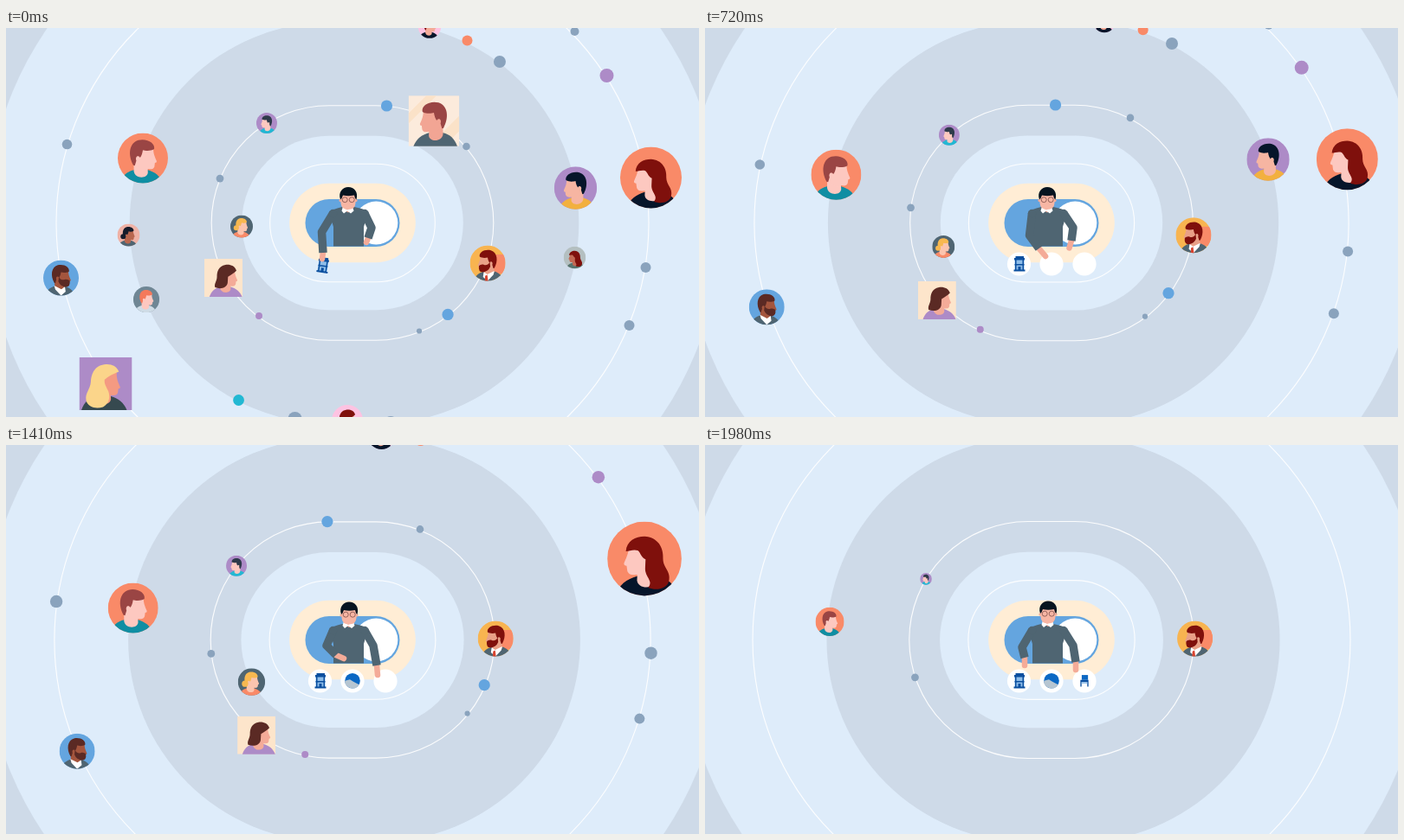
Write an HTML page with a canvas that moves like this. It is 800 by 450 pixels and loops after 2.01 s.

```html
<!DOCTYPE html>
<html lang="en">
<head>
<meta charset="utf-8">
<title>Orbit</title>
<style>
html, body { margin: 0; width: 100%; height: 100%; overflow: hidden; background: #deecfa; }
canvas { display: block; width: 800px; height: 450px; }
</style>
</head>
<body>
<canvas id="stage" width="800" height="450"></canvas>
<script>
const ctx = document.getElementById('stage').getContext('2d');
const LOOP = 2010, TAU = Math.PI * 2;
const LEFT = 373, RIGHT = 427, MID = 225.5, RUN = RIGHT - LEFT;

const light = '#deecfa', dark = '#cedae8', slate = '#4f6572', navy = '#06152a';
const orange = '#f98a68', purple = '#ad8bc7', blue = '#64a5df', steel = '#8aa3bd';
const maroon = '#7f100c', rust = '#9a4544', brown = '#5b2a24', cyan = '#22b8d3';
const pale = '#fdc8c0', peach = '#f4ab98', pink = '#fdc3e2', yellow = '#f8b850';

const clamp = (v, a, b) => Math.min(b, Math.max(a, v));
const mix = (a, b, k) => a + (b - a) * k;

// 0 to 1 with a swell of a quarter halfway
function pop(p) {
  const q = 1 - clamp(p, 0, 1);
  return 1 + 3 * q * q - 4 * q * q * q;
}

function disc(x, y, r, color) {
  if (r <= 0) return;
  ctx.fillStyle = color;
  ctx.beginPath();
  ctx.arc(x, y, r, 0, TAU);
  ctx.fill();
}

function pill(r, fill, line, dx = 0) {
  ctx.beginPath();
  ctx.arc(LEFT + dx, MID, r, Math.PI / 2, Math.PI * 1.5);
  ctx.arc(RIGHT + dx, MID, r, -Math.PI / 2, Math.PI / 2);
  ctx.closePath();
  if (fill) { ctx.fillStyle = fill; ctx.fill(); }
  if (line) { ctx.strokeStyle = line; ctx.lineWidth = 1.1; ctx.stroke(); }
}

function shape(color, d) {
  ctx.fillStyle = color;
  ctx.fill(new Path2D(d));
}

// Distance along a pill, counter-clockwise from its leftmost point
function toTrack(x, y) {
  const cx = clamp(x, LEFT, RIGHT), r = Math.hypot(x - cx, y - MID);
  let d;
  if (x < LEFT) d = Math.atan2(y - MID, LEFT - x) * r;
  else if (x > RIGHT) d = Math.PI * r + RUN + Math.atan2(MID - y, x - RIGHT) * r;
  else if (y > MID) d = Math.PI / 2 * r + x - LEFT;
  else d = Math.PI * 1.5 * r + RUN + RIGHT - x;
  return { r, d };
}

function onTrack({ r, d }, travel) {
  const len = TAU * r + 2 * RUN, q = Math.PI / 2 * r;
  let s = (d + travel + len) % len;
  if (s >= q && s < q + RUN) return [LEFT + s - q, MID + r];
  if (s >= 3 * q + RUN && s < 3 * q + 2 * RUN) return [RIGHT - (s - 3 * q - RUN), MID - r];
  if (s >= q && s < 3 * q + RUN) {
    const a = (s - RUN) / r - Math.PI;
    return [RIGHT + r * Math.cos(a), MID - r * Math.sin(a)];
  }
  if (s > q) s -= len;
  return [LEFT - r * Math.cos(s / r), MID + r * Math.sin(s / r)];
}

// x, y, speed, radius, time of vanishing, colour, time of stopping
const dots = [
  [70.5, 134.5, 34, 5.8, 1.55, steel],
  [656.5, 4, 13, 5, 9, steel],
  [693.5, 55, 14.3, 8, 1.475, purple],
  [738.5, 277, 26, 6, 1.6, steel],
  [719.5, 344, 21, 6, 1.9, steel],
  [532.5, 14.5, 41, 6, 1.6, orange],
  [570, 39, 52, 7, 1.2, steel],
  [268.5, 430.5, 48, 6.4, .39, cyan],
  [333.5, 452, 52, 8, .45, steel],
  [444, 457, 52, 8, .45, steel],
  [439.5, 90, 48.5, 6.6, 1.77, blue],
  [531.5, 137, 73, 4.3, 1.89, steel, .92],
  [247, 174, 48.7, 4.4, 9, steel],
  [510, 331.5, 48.8, 6.6, 1.77, blue],
  [477, 350.5, 48.8, 3.1, 1.95, steel],
  [292, 333, 42, 4, 1.95, purple]
].map(([x, y, v, size, end, color, stop = 9]) => ({ ...toTrack(x, y), v, size, end, color, stop }));

const people = [
  [744.5, 173, 29.8, 35.5, 1.6, { bg: orange, skin: pale, hair: maroon, top: navy, style: 'long', flip: 1 }],
  [63.5, 289, 48, 20.5, 1.93, { bg: blue, skin: '#a4553d', hair: brown, top: slate, beard: 1, collar: 1 }],
  [115, 411.5, 52, 30.5, .39, { bg: purple, skin: '#f49a82', hair: '#fbd58a', top: '#36494f', style: 'flow', square: 1 }],
  [158, 150.5, 28, 29, 2.015, { bg: orange, skin: pale, hair: rust, top: '#0f8ea3' }],
  [141.5, 239.5, 33, 13, .45, { bg: '#efb2a6', skin: '#b9674f', hair: '#161c2b', top: slate, style: 'bun' }],
  [162, 314, 36, 12.7, .2, { bg: '#6f8694', skin: pale, hair: '#f4795b', top: '#cfdce6' }],
  [657.5, 185, 47, 24.7, 1.2, { bg: purple, skin: '#f6b5a2', hair: navy, top: '#f2b03f', flip: 1 }],
  [656.5, 265.5, 48, 12.8, .465, { bg: '#b4bfc0', skin: '#c26a55', hair: maroon, top: '#58756f', style: 'long', flip: 1 }],
  [394, 454, 58, 18, .45, { bg: pink, skin: peach, hair: maroon, top: navy, style: 'bob' }],
  [489, -1.5, 40, 13.3, 1.6, { bg: pink, skin: peach, hair: maroon, top: navy }],
  [494, 107.5, 48, 24.7, .2, { bg: '#fcebdc', skin: '#f2a594', hair: rust, top: slate, square: 1, flip: 1, rays: 1 }],
  [301, 110, 32.5, 12, 2.015, { bg: purple, skin: pale, hair: '#2e3a4a', top: cyan, flip: 1 }],
  [251, 289, 43, 22, 1.95, { bg: '#fde5cb', skin: peach, hair: brown, top: purple, style: 'bob', square: 1, dx: 18 }],
  [272, 229.5, 32.8, 13, 1.6, { bg: slate, skin: '#fbc4ae', hair: yellow, top: orange, style: 'bun' }],
  [556, 272, 46.2, 20.5, 9, { bg: '#f8b450', skin: '#e9a087', hair: maroon, top: slate, beard: 1, collar: 1, tie: 1, corner: 1, flip: 1 }, 1.06]
].map(([x, y, v, size, end, look, stop = 9]) => ({ ...toTrack(x, y), v, size, end, look, stop }));

const hairs = {
  short: 'M-38 28C-60 -12 -56 -60 -18 -72C18 -80 50 -60 45 -36C30 -27 10 -29 0 -32C-2 -18 -6 -8 -11 -2C-18 -14 -32 -6 -26 10L-32 30Z',
  long: 'M50 -20C48 -48 24 -60 0 -60C-36 -58 -52 -30 -50 0C-50 25 -72 34 -66 60C-60 84 -28 86 -10 78C-26 60 0 50 -2 24L-3 2C10 -4 10 -16 18 -22C30 -26 40 -20 50 -20Z',
  flow: 'M50 -46C42 -66 24 -75 2 -74C-40 -72 -54 -40 -56 -8C-58 22 -78 34 -74 62C-68 90 -36 96 -10 88C14 76 18 50 10 28C2 10 -6 0 -4 -16C10 -28 30 -38 50 -46Z',
  bob: 'M50 -38C42 -64 15 -72 -8 -68C-44 -62 -52 -32 -52 -5C-53 20 -68 30 -62 50C-32 62 0 52 4 26L6 -6C20 -16 38 -26 50 -38Z'
};

function avatar(x, y, size, o) {
  if (size <= 0) return;
  ctx.save();
  ctx.translate(x, y);
  ctx.scale(size / 100, size / 100);
  ctx.beginPath();
  if (o.square) ctx.rect(-100, -100, 200, 200);
  else ctx.arc(0, 0, 100, 0, TAU);
  ctx.clip();
  ctx.fillStyle = o.bg;
  ctx.fillRect(-100, -100, 200, 200);
  if (o.rays) shape('#fbe2c8', 'M-100 10L10 -100H-30L-100 -30ZM-20 100L100 -20V40L40 100Z');
  if (o.corner) shape(orange, 'M30 -48H100V60H30Z');
  if (o.flip) ctx.scale(-1, 1);
  ctx.translate(o.dx || 0, 0);
  shape(o.top, 'M-95 110C-85 72 -65 54 -36 47H20C50 56 72 72 84 110Z');
  shape(o.skin, 'M-36 0L18 20L20 58C18 84 -32 84 -36 52Z');
  if (o.collar) shape('#fff', 'M-38 44L-32 66L0 100L26 78L22 50L2 64Z');
  if (o.tie) shape('#d8432f', 'M2 66L14 72L16 110H-4Z');
  shape(o.skin, 'M-32 -40L42 -42C40 -20 48 -4 55 12Q56 18 48 19L46 34Q41 47 22 43L0 48L-34 26Z');
  if (o.beard) shape(o.hair, 'M-12 -8C-8 8 8 14 20 10C32 5 42 10 49 16Q54 50 28 52Q-4 48 -15 20Z');
  shape(o.hair, hairs[o.style] || hairs.short);
  if (o.style === 'bun') disc(-48, 14, 23, o.hair);
  ctx.restore();
}

// Joint positions over time, as x, y pairs
const times = [0, .24, .51, .93, 1.41, 1.74, 1.98];
const joints = {
  elbowL: [364.5, 236, 366, 238, 371, 237, 378, 243, 370, 232, 365, 235, 366, 234],
  wristL: [366, 260, 369, 258, 380, 253, 391, 257, 381, 243, 369, 246, 369, 246],
  handL: [365, 267, 370, 266, 387, 261, 399, 267, 390, 247, 375, 252, 369, 255],
  elbowR: [422, 231, 423, 232, 424, 233, 426, 229, 424, 232, 425, 233, 425, 232],
  wristR: [418, 243, 423, 245, 424, 246, 422, 246, 428, 255, 429, 257, 428, 251],
  handR: [416, 248, 422, 253, 421, 255, 420, 254, 429, 266, 432, 268, 428, 260],
  head: [395, 198.5, 395, 198.5, 395, 198.5, 395, 198.5, 396, 196, 396.5, 195, 396, 195]
};

function joint(name, t) {
  const p = joints[name];
  let i = 0;
  while (i < times.length - 2 && t > times[i + 1]) i++;
  let k = clamp((t - times[i]) / (times[i + 1] - times[i]), 0, 1);
  k = k * k * (3 - 2 * k);
  return [mix(p[2 * i], p[2 * i + 2], k), mix(p[2 * i + 1], p[2 * i + 3], k)];
}

function line(points, width, color, cap) {
  ctx.beginPath();
  points.forEach(p => ctx.lineTo(p[0], p[1]));
  ctx.strokeStyle = color;
  ctx.lineWidth = width;
  ctx.lineCap = cap;
  ctx.lineJoin = 'round';
  ctx.stroke();
}

function arm(side, shoulder, t) {
  const [elbow, wrist, hand] = ['elbow', 'wrist', 'hand'].map(n => joint(n + side, t));
  line([wrist, hand], 6.5, peach, 'round');
  line([shoulder, elbow, wrist], 9.5, slate, 'butt');
  disc(...shoulder, 4.7, slate);
}

function man(t) {
  const [hx, hy] = joint('head', t);
  shape(slate, 'M373 213Q376 210 388 207H402Q414 209 418 213L413 230V252.5H378V230Z');
  arm('R', [414, 214.5], t);
  arm('L', [377.5, 214.5], t);
  ctx.save();
  ctx.translate(hx, hy);
  shape(peach, 'M-4.5 6H5V12L0 15L-4.5 12Z');
  shape('#fff', 'M-6 8L-1 12L5 8L6.5 13L3 16L-1 13L-5 16L-7.5 13Z');
  disc(-8.8, 1, 1.8, peach);
  disc(8.8, 1, 1.8, peach);
  shape('#f7b6a4', 'M-8.5 -6H8.5V4Q8 11.5 0 11.5Q-8 11.5 -8.5 4Z');
  shape('#07141f', 'M-9 0C-12 -9 -6 -14.5 0 -14.5C7 -14.5 12 -9 9.5 0L8 -1.5L7 -5Q0 -3.5 -6 -5L-7.5 -1.5Z');
  ctx.strokeStyle = '#80504a';
  ctx.lineWidth = .8;
  for (const x of [-3.8, 4.2]) {
    ctx.beginPath();
    ctx.arc(x, .2, 3, 0, TAU);
    ctx.stroke();
  }
  ctx.restore();
}

function icon(x, y, scale, turn, draw) {
  if (scale <= 0) return;
  ctx.save();
  ctx.translate(x, y);
  ctx.rotate(turn);
  ctx.scale(scale, scale);
  draw();
  ctx.restore();
}

function building() {
  shape('#8ebde8', 'M-5.5 -5H5.5V7H-5.5Z');
  shape('#0b4f9f', 'M-4.5 -9H5V-7H6V-4.5H-6V-7H-4.5ZM-5 -5H-3.5V7H-5ZM3.5 -5H5V7H3.5ZM-5.5 0H5.5V1.5H-5.5ZM-1.5 3H1.5V7H-1.5ZM-6.5 6.5H6.5V8.5H-6.5Z');
}

function chart() {
  disc(0, 0, 8.8, '#0b68c4');
  shape('#b6c5d1', 'M-8.8 0L-3 -1.5L1 1L7.6 4.4A8.8 8.8 0 0 1 -8.8 0Z');
}

function chair() {
  shape('#0b68c4', 'M-3 -6.5H4V-1H-3Z');
  shape('#0b4f9f', 'M-4.5 -1H4.5V1.5H-4.5ZM-4.5 1.5H-3.2V6.5H-4.5ZM3.2 1.5H4.5V6.5H3.2Z');
  shape('#8ebde8', 'M-3.2 1.5H3.2V3H-3.2Z');
}

function scene(t) {
  const grow = 1 + .0044 * t, white = 'rgba(255,255,255,.92)';
  ctx.fillStyle = dark;
  ctx.fillRect(0, 0, 800, 450);

  ctx.save();
  ctx.translate(400, MID);
  ctx.scale(grow, grow);
  ctx.translate(-400, -MID);
  pill(397, light, null, 1.5);
  pill(315, null, white);
  pill(232.3, dark, null, 2);
  pill(135.8, null, white);
  pill(100.8, light);
  pill(68.3, null, white);
  ctx.restore();

  const place = o => {
    const [x, y] = onTrack(o, o.v * Math.min(t, o.stop));
    return [400 + (x - 400) * grow, MID + (y - MID) * grow];
  };
  const swell = o => o.size * pop((o.end - t) / .3);
  dots.forEach(o => disc(...place(o), swell(o), o.color));
  people.forEach(o => avatar(...place(o), swell(o), o.look));

  pill(45.8, '#ffedd5');
  pill(27.5, blue);
  disc(427.3, MID, 25, '#fff');

  [[362.5, .03], [400, .09], [438, .13]].forEach(([x, start]) =>
    disc(x, 273, 13.6 * pop((t - start) / .3), '#fff'));
  const k = clamp(t / .24, 0, 1);
  const drop = k * k * (3 - 2 * k);
  icon(mix(366, 363, drop), mix(274.5, 273, drop), 1, .15 * (1 - drop), building);
  icon(400, 272.8, pop((t - 1.02) / .3), 0, chart);
  icon(438, 272.8, pop((t - 1.76) / .25), 0, chair);
  man(t);
}

const begin = performance.now();
function frame() {
  scene(((performance.now() - begin) % LOOP) / 1000);
  requestAnimationFrame(frame);
}
frame();
</script>
</body>
</html>
```
